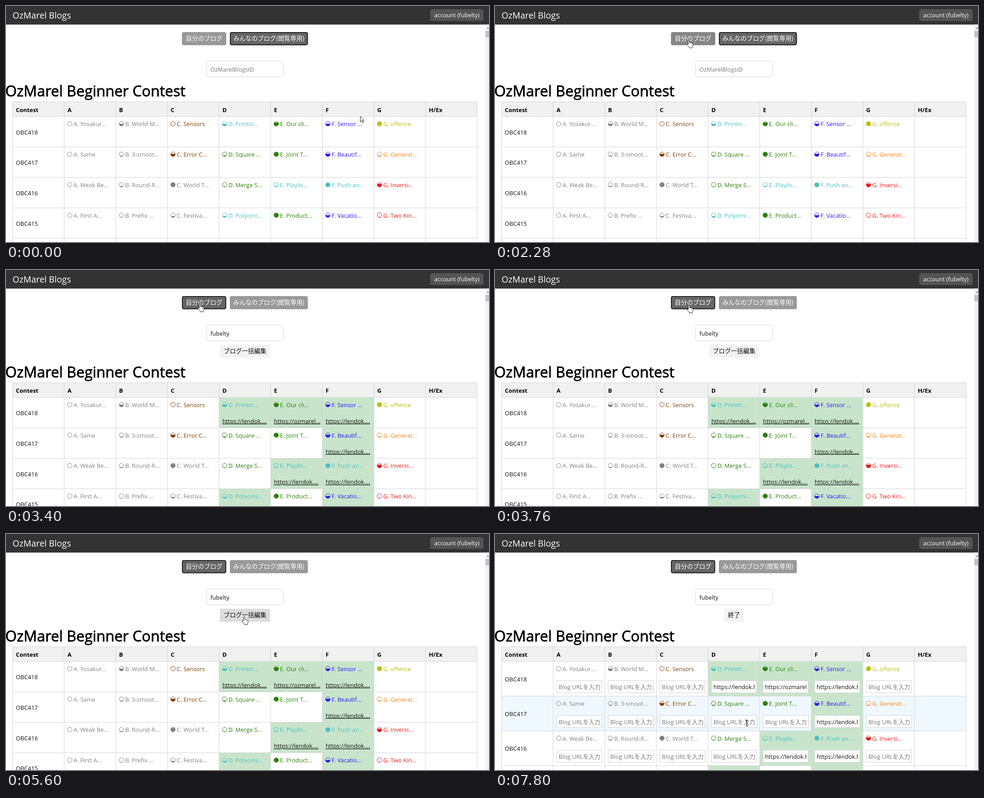
Write an HTML page that moves like this. It is 1068x525 px and loops after 8000 ms.

```html
<!DOCTYPE html>
<html lang="ja">
<head>
<meta charset="utf-8">
<title>Contest blogs</title>
<style>
html, body { margin: 0; width: 100%; height: 100%; overflow: hidden; background: #fff; }
svg { display: block; }
text { font: 12.9px "Open Sans", "Noto Sans", "Noto Sans CJK JP", sans-serif; white-space: pre; }
.jp { font: 13.5px "Noto Sans CJK JP", "Noto Sans CJK", sans-serif; }
.brand { font-size: 19.3px; }
.h1 { font-size: 32.6px; stroke: #000; stroke-width: .8; }
.th { font-weight: 700; }
.link { text-decoration: underline; }
</style>
</head>
<body>
<svg id="stage" width="1068" height="525" viewBox="0 0 1068 525"></svg>
<script>
const LOOP = 8000, STEP = 40;
const LEFT = 14.5, COL = 114.15, HEAD = 32.4, TOP = 213.3, SHIFT = 37.6;
const USER = 'fubelty', SITE = 'OzMarel';
const stage = document.getElementById('stage');

function el(parent, tag, attrs = {}, text) {
  const node = document.createElementNS('http://www.w3.org/2000/svg', tag);
  for (const k in attrs) node.setAttribute(k, attrs[k]);
  if (text !== undefined) node.textContent = text;
  parent.appendChild(node);
  return node;
}
const group = parent => el(parent, 'g');
const rect = (p, x, y, width, height, fill, more) => el(p, 'rect', { x, y, width, height, fill, ...more });
const label = (p, x, y, s, fill = '#111', cls = '', more) => el(p, 'text', { x, y, fill, class: cls, ...more }, s);
const show = (node, on) => node.setAttribute('visibility', on ? 'visible' : 'hidden');
const colX = i => LEFT + COL * i;

const HUE = {
  k: '#808080', n: '#804000', g: '#2a8006', c: '#48bfc0',
  b: '#2d18f4', y: '#bdbd0c', o: '#f58412', r: '#ee1616'
};
// Each problem: colour key, fill level in tenths, title.
const ROWS = [
  { name: 'OBC418', posts: 'DEF', tasks: ['k0 Yosakur...', 'k5 World M...', 'n0 Sensors', 'c5 Printin...', 'g8 Our cli...', 'b5 Sensor ...', 'y10 offence'] },
  { name: 'OBC417', posts: 'F', tasks: ['k0 Same', 'k2 3-smoot...', 'n6 Error C...', 'g2 Square ...', 'g10 Joint T...', 'b6 Beautif...', 'o2 Generat...'] },
  { name: 'OBC416', posts: 'EF', tasks: ['k0 Weak Be...', 'k2 Round-R...', 'k10 World T...', 'g1 Merge S...', 'c2 Playlis...', 'c9 Push an...', 'r7 Inversi...'] },
  { name: 'OBC415', posts: 'DF', tasks: ['k0 First A...', 'k1 Prefix ...', 'k3 Festiva...', 'c3 Polyomi...', 'g10 Product...', 'b5 Vacatio...', 'r1 Two Kin...'] }
];

function dial(p, x, y, level, color) {
  const r = 5, h = r - 2 * r * level, w = Math.sqrt(r * r - h * h);
  el(p, 'circle', { cx: x, cy: y, r, fill: level === 1 ? color : 'none', stroke: color });
  if (level > 0 && level < 1)
    el(p, 'path', { d: `M${x - w} ${y + h}A${r} ${r} 0 ${level > .5 ? 1 : 0} 0 ${x + w} ${y + h}Z`, fill: color });
}

function field(p, x, y, value) {
  rect(p, x, y, 100, 27, '#fff', { stroke: '#cfcfcf' });
  const clip = el(p, 'svg', { x: x + 4, y, width: 92, height: 27 });
  label(clip, 0.4, 19, value || 'Blog URLを入力', value ? '#111' : '#777');
}

function table(parent, top, rowH, edit) {
  const root = group(parent), hover = group(root), green = group(root), lines = group(root), body = group(root);
  const links = group(root), first = top + HEAD;
  rect(lines, LEFT, top, COL * 9, HEAD, '#f1f1f1');
  ['Contest', ...'ABCDEFG', 'H/Ex'].forEach((s, i) => label(body, colX(i) + 7.3, top + 22.2, s, '#000', 'th'));
  const rows = ROWS.map((row, r) => {
    const y = first + rowH * r;
    label(body, LEFT + 7.3, y + rowH / 2 + 5.9, row.name);
    row.tasks.forEach((task, i) => {
      const [, hue, tenths, title] = task.match(/^(.)(\d+) (.*)$/);
      const letter = 'ABCDEFG'[i], x = colX(i + 1), posted = row.posts.includes(letter);
      dial(body, x + 12.3, y + 16.3, tenths / 10, HUE[hue]);
      label(body, x + 20.6, y + 21.6, `${letter}. ${title}`, HUE[hue]);
      const url = 'https://' + (letter === 'E' && r === 0 ? (edit ? 'ozmarel-b' : 'ozmarel') : (edit ? 'lendok.hat' : 'lendok.'));
      if (posted) rect(green, x, y, COL, rowH, '#c8e5cb');
      if (edit) field(body, x + 7.5, y + 43, posted && url);
      else if (posted) label(links, x + 7.3, y + 57.5, url + '...', '#111', 'link');
    });
    return rect(hover, LEFT, y, COL * 9, rowH, '#f0f8ff');
  });
  let d = `M${LEFT} ${top}H${colX(9)}`;
  for (let r = 0; r < 5; r++) d += `M${LEFT} ${first + rowH * r}H${colX(9)}`;
  for (let i = 0; i < 10; i++) d += `M${colX(i)} ${top}V540`;
  el(lines, 'path', { d, stroke: '#d2d2d2', fill: 'none' });
  return { root, rows, posts: [green, links], first, rowH };
}

// Page
rect(stage, 0, 0, 1068, 525, '#fff');
const page = group(stage);
const title = label(page, -1.5, 201, SITE + ' Beginner Contest', '#000', 'h1');
const view = table(page, TOP, 67.8, false);
const editor = table(page, TOP + SHIFT, 77.3, true);

rect(page, 0, 0, 1068, 41.3, '#333');
rect(page, 0, 0, 1068, 1, '#252525');
label(page, 14.5, 28, SITE + ' Blogs', '#fff', 'brand');
rect(page, 938, 7, 118, 26.3, '#545454', { rx: 4 });
label(page, 997, 25.3, `account (${USER})`, '#fff', '', { 'text-anchor': 'middle' });

rect(page, 1059, 41.3, 9, 484, '#f1f1f1');
rect(page, 1060, 55.5, 8, 14, '#c1c1c1');
el(page, 'path', { d: 'M1062.5 50.5l3-3.2 3 3.2z', fill: '#8a8a8a' });

function tab(x, w, s) {
  const box = rect(page, x, 58, w, 29.2, '#999', { rx: 4 });
  const edge = rect(page, x + 1, 59, w - 2, 27.2, 'none', { rx: 3.5, stroke: '#222', 'stroke-width': 2 });
  label(page, x + w / 2, 77.2, s, '#fff', 'jp', { 'text-anchor': 'middle' });
  return { box, edge, x, w };
}
const mine = tab(389, 98, '自分のブログ');
const all = tab(495, 172.5, 'みんなのブログ(閲覧専用)');

rect(page, 443.5, 122.5, 170, 35, '#fff', { rx: 4.5, stroke: '#d8d8d8' });
const hint = label(page, 452, 146, SITE + 'BlogsID', '#777');
const user = label(page, 452, 146, USER);

function action(x, w, s) {
  const root = group(page), box = rect(root, x, 166.3, w, 29, '#f3f3f3');
  label(root, x + w / 2, 185.4, s, '#111', 'jp', { 'text-anchor': 'middle' });
  return { root, box, x, w };
}
const bulk = action(473, 111, 'ブログ一括編集');
const done = action(506.5, 44, '終了');

// Pointer
const pointer = group(stage);
const ink = { fill: '#fff', stroke: '#222', 'stroke-width': 1, 'stroke-linejoin': 'round' };
const shapes = {
  arrow: el(pointer, 'path', { d: 'M.5.5V12.6L3.3 10 5.3 14.9 7.4 14 5.4 9.3H9.2Z', ...ink }),
  hand: el(pointer, 'path', { d: 'M-1.5 10V1.8a1.4 1.4 0 0 1 2.8 0V6.6q2.4-.8 2.8.8 2.2-.6 2.6.9 2-.3 2 1.6v3.2q0 1.8-1.4 3.2v1.7H.4v-1.7q-2-2-4.9-5.6 0-2.2 3-.7z', ...ink }),
  beam: el(pointer, 'path', { d: 'M-1.5-6H.7M2.3-6H4.5M1.5-5.5V6M-1.5 6.5H.7M2.3 6.5H4.5', stroke: '#111', 'stroke-width': 1.3, fill: 'none' })
};
const ring = el(stage, 'circle', { r: 10, fill: '#ff0', 'fill-opacity': .47 });

// Moves: start, end, from, to, downward bow
const MOVES = [
  [40, 280, [783, 245], [629, 75], 0],
  [600, 1520, [629, 75], [429, 75], 5],
  [3720, 4200, [429, 75], [434, 203], 0],
  [4480, 5120, [434, 203], [526.5, 183.5], 0],
  [6840, 7320, [526.5, 183.5], [555.5, 420.5], 0]
];
const CLICKS = [[2080, 2280], [5320, 5600], [7520, 7800]];
const clamp = v => Math.max(0, Math.min(1, v));

function pointerAt(t) {
  let pos = MOVES[0][2];
  for (const [a, b, from, to, bow] of MOVES) {
    if (t < a) break;
    const k = clamp((t - a) / (b - a)), p = k * k * (3 - 2 * k);
    pos = from.map((v, i) => v + (to[i] - v) * p);
    pos[1] += bow * Math.sin(Math.PI * p);
  }
  return pos;
}

function paintTab({ box, edge }, on, hovered) {
  const base = hovered ? 134 : 153, g = Math.round(base + (102 - base) * on);
  box.setAttribute('fill', `rgb(${g},${g},${g})`);
  edge.setAttribute('opacity', on);
}

function render(time) {
  const t = Math.floor(time / STEP) * STEP;
  const filled = t >= 3280, posted = t >= 3360, editing = t >= 6320;
  const [x, y] = pointerAt(t);
  const over = (b, top, bottom) => x >= b.x && x <= b.x + b.w && y >= top && y <= bottom;
  const shift = filled ? SHIFT : 0;

  title.setAttribute('transform', `translate(0 ${shift})`);
  view.root.setAttribute('transform', `translate(0 ${shift})`);
  view.root.style.display = editing ? 'none' : '';
  editor.root.style.display = editing ? '' : 'none';
  view.posts.forEach(g => show(g, posted));
  show(hint, !filled);
  show(user, filled);

  const swap = clamp((t - 3320) / 80);
  const onMine = over(mine, 58, 87), onAll = over(all, 58, 87);
  paintTab(mine, swap, onMine);
  paintTab(all, 1 - swap, onAll);

  const current = editing ? done : bulk;
  const onAction = filled && over(current, 166, 195);
  show(bulk.root, filled && !editing);
  show(done.root, editing);
  current.box.setAttribute('fill', onAction ? '#dcdcdc' : '#f3f3f3');

  const { first, rowH } = editing ? editor : view;
  const offset = y - first - (editing ? 0 : shift), row = Math.floor(offset / rowH);
  [view, editor].forEach(tb => tb.rows.forEach((r, i) => show(r, i === row)));
  const inField = editing && row >= 0 && offset % rowH > 43 && offset % rowH < 70;

  const kind = onMine || onAll || onAction ? 'hand' : inField ? 'beam' : 'arrow';
  for (const k in shapes) show(shapes[k], k === kind);
  pointer.setAttribute('transform', `translate(${x} ${y})`);
  ring.setAttribute('cx', x);
  ring.setAttribute('cy', y);
  show(ring, CLICKS.some(([a, b]) => t >= a && t < b));
}

const start = performance.now();
function tick() {
  render((performance.now() - start) % LOOP);
  requestAnimationFrame(tick);
}
tick();
</script>
</body>
</html>
```
